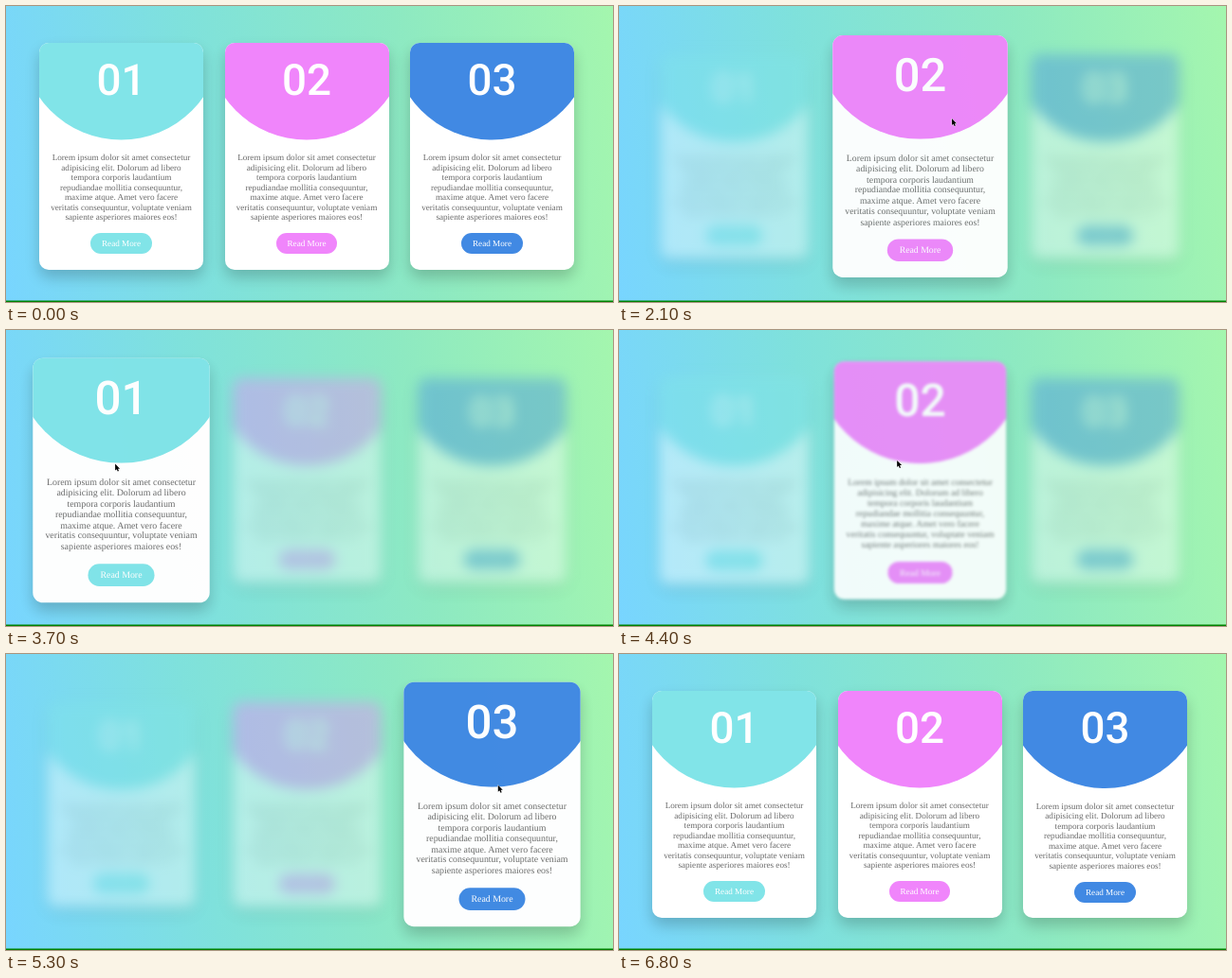
Recreate the animation shown at these times as an HTML page. Size 640 by 313 pixels, loop 6.9 s.

```html
<!DOCTYPE html>
<html lang="en">
<head>
<meta charset="utf-8">
<title>Hover cards</title>
<style>
html, body { margin: 0; width: 100%; height: 100%; overflow: hidden; }
body { position: relative; background: linear-gradient(82deg, #78d5ff, #7fe1dc 33%, #8de9c2 66%, #a4f6ae); }
body::after {
  content: ""; position: absolute; left: 0; right: 0; bottom: 0; height: 2px;
  background: linear-gradient(#00800080 50%, #008000 50%);
}
.card {
  position: absolute; top: 38.5px; width: 173px; height: 240px;
  border-radius: 10px; background: #fff; box-shadow: 0 8px 15px #0003;
  font: 9.17px/10.55px "Liberation Serif", serif; text-align: center;
  text-rendering: geometricPrecision;
}
.head {
  height: 103px; border-radius: 10px 10px 0 0; background: var(--tone);
  clip-path: circle(105.6px at 50% -2.6px);
  font: 500 45.8px/82px Roboto, sans-serif; color: #fff;
}
p { position: absolute; top: 116.7px; left: 0; width: 100%; margin: 0; color: #6a6a6a; white-space: pre; }
.more {
  position: absolute; left: 54.2px; top: 201.5px; width: 64.6px; height: 22px;
  border-radius: 11px; background: var(--tone); color: #fff; line-height: 22px;
}
#cursor { position: absolute; left: 0; top: 0; overflow: visible; }
</style>
</head>
<body>
<svg id="cursor" width="8" height="10">
  <path d="M0 0V7L1.6 5.6 2.7 8 3.9 7.4 2.9 5.1H5Z" stroke="#fff" stroke-width=".8" paint-order="stroke"/>
</svg>
<script>
const LOOP = 6900, DURATION = 500;
const copy = `Lorem ipsum dolor sit amet consectetur
adipisicing elit. Dolorum ad libero
tempora corporis laudantium
repudiandae mollitia consequuntur,
maxime atque. Amet vero facere
veritatis consequuntur, voluptate veniam
sapiente asperiores maiores eos!`;
const cursor = document.getElementById("cursor");

const cards = ["#81e4e8", "#f085fb", "#4189e3"].map((tone, i) => {
  const card = document.createElement("div");
  card.className = "card";
  card.style.left = 35 + 195.5 * i + "px";
  card.style.setProperty("--tone", tone);
  card.innerHTML = `<div class="head">0${i + 1}</div><p>${copy}</p><div class="more">Read More</div>`;
  document.body.insertBefore(card, cursor);
  return card;
});

// Pointer over: a card index, the gap between cards, or nothing
const GAP = -1, OUT = -2;
const hovers = [
  [1550, GAP], [1780, 1], [3205, GAP], [3275, 0], [4060, GAP],
  [4140, 1], [4880, GAP], [4890, 2], [5845, OUT]
];
const path = [
  [1500, 425, -4], [1780, 385, 40], [2100, 351, 119], [2600, 325, 150], [3000, 285, 149],
  [3205, 229, 147], [3300, 168, 146], [3650, 110, 142], [3900, 135, 140], [4060, 205, 139],
  [4140, 232, 139], [4400, 293, 138], [4700, 340, 137], [4880, 415, 136], [5000, 509, 135],
  [5400, 522, 140], [5650, 520, 110], [5845, 515, -10]
];

const lerp = (a, b, k) => a + (b - a) * k;

// cubic-bezier(.25, .1, .25, 1)
function ease(x) {
  if (x <= 0) return 0;
  if (x >= 1) return 1;
  let lo = 0, hi = 1, s;
  for (let i = 0; i < 20; i++) {
    s = (lo + hi) / 2;
    if (.75 * s * (1 - s) + s ** 3 < x) lo = s; else hi = s;
  }
  return .3 * s * (1 - s) ** 2 + 3 * s * s * (1 - s) + s ** 3;
}

// Returns [dimmed, grown], each from 0 to 1
function cardState(index, time) {
  let from = [0, 0], to = from, start = 0;
  const at = t => from.map((v, i) => lerp(v, to[i], ease((t - start) / DURATION)));
  for (const [t, over] of hovers) {
    if (t > time) break;
    const next = over === OUT ? [0, 0] : over === index ? [0, 1] : [1, 0];
    if (next.join() === to.join()) continue;
    from = at(t);
    to = next;
    start = t;
  }
  return at(time);
}

function moveCursor(t) {
  const i = path.findIndex(p => p[0] > t);
  cursor.style.display = i > 0 ? "" : "none";
  if (i < 1) return;
  const a = path[i - 1], b = path[i], k = (t - a[0]) / (b[0] - a[0]);
  cursor.style.transform = `translate(${lerp(a[1], b[1], k)}px, ${lerp(a[2], b[2], k)}px)`;
}

function draw(now) {
  const t = now % LOOP;
  cards.forEach((card, i) => {
    const [dim, grow] = cardState(i, t);
    card.style.transform = `scale(${1 + .08 * grow - .1 * dim})`;
    card.style.opacity = 1 - .6 * dim;
    card.style.filter = dim > .001 ? `blur(${7.5 * dim}px)` : "none";
  });
  moveCursor(t);
  requestAnimationFrame(draw);
}
draw(0);
</script>
</body>
</html>
```
